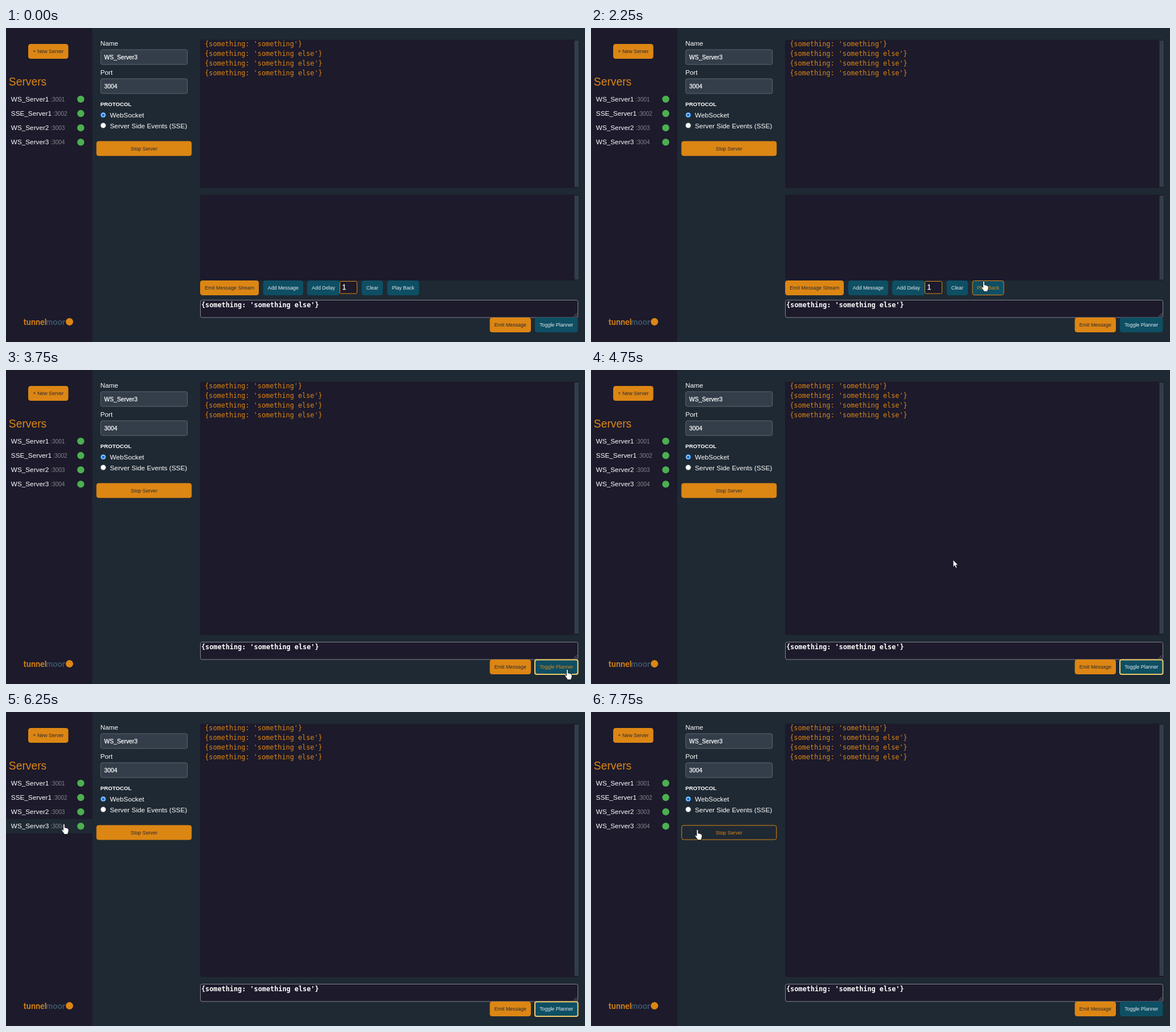
An HTML page for the animation above (8000 ms loop, 1017 by 551 pixels).

```html
<!DOCTYPE html>
<html lang="en">
<head>
<meta charset="utf-8">
<title>Server panel</title>
<style>
html, body { margin: 0; width: 100%; height: 100%; overflow: hidden; background: #1f2933; }
svg { display: block; width: 1017px; height: 551px; font-family: "Liberation Sans", Arial, sans-serif; }
text { white-space: pre; }
.mono { font-family: "DejaVu Sans Mono", monospace; font-size: 11.83px; }
.btn { font-size: 8.87px; text-anchor: middle; }
</style>
</head>
<body>
<svg id="stage" viewBox="0 0 1017 551"></svg>
<script>
const ORANGE = '#dc8614', TEAL = '#0e4f64', DARK = '#1c1a2b', BG = '#1f2933', SLATE = '#333e4a';
const stage = document.getElementById('stage');

function add(tag, attrs, content = '') {
  const el = document.createElementNS('http://www.w3.org/2000/svg', tag);
  set(el, attrs);
  el.textContent = content;
  stage.append(el);
  return el;
}
function set(el, attrs) {
  for (const k in attrs) el.setAttribute(k, attrs[k]);
}
const box = (x, y, width, height, fill, more) => add('rect', { x, y, width, height, fill, ...more });
const text = (x, y, size, fill, str, more) => add('text', { x, y, 'font-size': size, fill, ...more }, str);
const inside = (p, x, y, w, h) => p && p[0] >= x && p[0] < x + w && p[1] >= y && p[1] < y + h;

// Sidebar
box(0, 0, 151.5, 551, DARK);
text(4.8, 100.5, 19.3, ORANGE, 'Servers');
const rows = ['WS_Server1', 'SSE_Server1', 'WS_Server2', 'WS_Server3'].map((name, i) => {
  const y = 112.3 + i * 25.15;
  const el = box(0, y, 151.5, 25.15, DARK);
  text(8.8, y + 16.5, 11.75, '#fff', name);
  text(i === 1 ? 82.5 : 78.3, y + 16.5, 10, '#85858d', ':' + (3001 + i));
  add('circle', { cx: 131.3, cy: y + 12.6, r: 6.2, fill: '#4caf50' });
  return { el, y };
});
const brand = { 'font-family': 'Lato, sans-serif', 'font-weight': 700 };
text(30.5, 521, 14.3, ORANGE, 'tunnel', brand);
text(104, 521, 14.3, '#3f566b', 'moor', { ...brand, 'text-anchor': 'end' });
add('circle', { cx: 111.5, cy: 515.5, r: 6.5, fill: ORANGE });

// Server form
text(165.7, 31, 11.75, '#fff', 'Name');
text(165.7, 81.6, 11.75, '#fff', 'Port');
[[38, 'WS_Server3'], [89, '3004']].forEach(([y, value]) => {
  box(166.4, y, 152.2, 26, SLATE, { rx: 3, stroke: '#5c6670' });
  text(172.6, y + 16.6, 10.3, '#fff', value, { stroke: '#fff', 'stroke-width': .25 });
});
text(165.7, 136.6, 9.7, '#fff', 'PROTOCOL', { 'font-weight': 700 });
[[152.7, 'WebSocket'], [171, 'Server Side Events (SSE)']].forEach(([cy, label], i) => {
  add('circle', { cx: 170.8, cy, r: i ? 4.6 : 4.2, fill: '#fff', stroke: i ? '#777' : '#1275d8', 'stroke-width': i ? .7 : 1.2 });
  if (!i) add('circle', { cx: 170.8, cy, r: 2.7, fill: '#1275d8' });
  text(182.5, cy + 4.7, 11.8, '#fff', label);
});

// Message log and planner
const log = box(341, 20.5, 666, 260, DARK, { rx: 3 });
const logBar = box(998.5, 22, 7.5, 257, SLATE);
const lines = ["{something: 'something'}", ...Array(3).fill("{something: 'something else'}")];
lines.forEach((line, i) => text(349.2, 32.3 + i * 17, 11.83, ORANGE, line, { class: 'mono' }));
const planner = [
  box(341, 292.5, 666, 150.5, DARK, { rx: 3 }),
  box(998.5, 294, 7.5, 147.5, SLATE),
  box(586.5, 444.5, 30, 21.5, DARK, { rx: 2, stroke: ORANGE }),
  text(590.5, 459.3, 12.5, '#fff', '1', { stroke: '#fff', 'stroke-width': .3 })
];
box(341.5, 477.5, 663, 30.5, DARK, { rx: 3, stroke: '#85858c' });
text(343, 489.8, 11.83, '#fff', lines[1], { class: 'mono', 'font-weight': 700 });
add('path', { d: 'M997 506.5l6-6M1000.5 506.5l2.5-2.5', stroke: '#999', 'stroke-width': .8 });

const buttons = [
  ['+ New Server', 39, 28, 70.5],
  ['Stop Server', 158.7, 198.5, 167.5],
  ['Emit Message Stream', 341, 443, 103, 1],
  ['Add Message', 451.7, 443, 70.3, 1],
  ['Add Delay', 529, 443, 57, 1],
  ['Clear', 624.7, 443, 37.3, 1],
  ['Play Back', 669.5, 443, 56, 1],
  ['Emit Message', 849.7, 508, 72.3],
  ['Toggle Planner', 929, 508, 75.5]
].map(([label, x, y, w, planned]) => {
  const teal = /^(Add|Clear|Play|Toggle)/.test(label);
  const el = box(x + .5, y + .5, w - 1, 25, '', { rx: 3.5 });
  const tag = text(x + w / 2, y + 16, 8.87, '', label, { class: 'btn' });
  return { el, tag, x, y, w, planned, teal };
});
const ring = box(929, 508.5, 75.5, 25.5, 'none', { rx: 3, stroke: '#f0cc6a', 'stroke-width': 2 });

// Pointers, drawn with the hot spot at 0,0
const outline = { stroke: '#111', 'stroke-width': .9, 'stroke-linejoin': 'round' };
const pointers = {
  arrow: add('path', { d: 'M0 0V12.6L2.9 10L4.8 14.6L7 13.6L5.1 9.2H8.8Z', fill: '#fff', ...outline }),
  hand: add('path', {
    d: 'M-1.6 .8Q-1.6-.6-.2-.6T1.2.8V6Q3.2 5.2 3.8 6.6Q5.4 6 6 7.4Q8 7 8 9V12Q8 14 6.8 15.3V17.6H-.4V15.8Q-2.6 13.6-4.2 10.6Q-4.6 8.8-3 8.8L-1.6 10.4Z',
    fill: '#fff', ...outline
  }),
  beam: add('path', { d: 'M-2.5-7.5H2.5M0-7.5V7.5M-2.5 7.5H2.5', fill: 'none', stroke: '#fff' })
};

// Pointer place by time in ms; each holds until the next
const path = [
  [500, 504, 524], [750, 522, 497], [1000, 549, 455], [1250, 562, 450], [1500, 603, 455],
  [1750, 642, 450], [2000, 678, 447], [2250, 690, 445], [2500, 752, 466], [2750, 855, 500],
  [3000, 924, 517], [3250, 975, 524], [3500, 986, 526],
  [4250, 930, 480], [4500, 790, 410], [4750, 636, 333], [5000, 480, 258], [5250, 352, 194],
  [5500, 225, 160], [5750, 114, 173], [6000, 106, 194], [6250, 102, 197],
  [7500, 142, 202], [7750, 187, 207]
];

function draw(t) {
  const step = path.filter(p => p[0] <= t).pop();
  const pos = step && step.slice(1);
  const open = t < 3750;
  const show = (el, on) => set(el, { visibility: on ? 'visible' : 'hidden' });
  let hit = false;

  set(log, { height: open ? 260 : 444.5 });
  set(logBar, { height: open ? 257 : 441 });
  planner.forEach(el => show(el, open));
  show(ring, !open && t < 6750);

  for (const r of rows) {
    const over = inside(pos, 0, r.y, 151.5, 25.15);
    hit ||= over;
    set(r.el, { fill: over ? BG : DARK });
  }
  for (const b of buttons) {
    const on = open || !b.planned;
    const over = on && inside(pos, b.x, b.y, b.w, 26);
    hit ||= over;
    show(b.el, on);
    show(b.tag, on);
    const fill = b.teal ? TEAL : over ? BG : ORANGE;
    set(b.el, { fill, stroke: over ? ORANGE : fill });
    set(b.tag, { fill: over ? ORANGE : b.teal ? '#e4e8ea' : '#2b2a33' });
  }

  const typing = inside(pos, 341, 477, 664, 31) || open && inside(pos, 586, 444, 31, 22);
  const kind = hit ? 'hand' : typing ? 'beam' : 'arrow';
  for (const k in pointers) {
    show(pointers[k], pos && k === kind);
    if (pos) set(pointers[k], { transform: `translate(${pos})` });
  }
}

const start = performance.now();
function tick() {
  draw((performance.now() - start) % 8000);
  requestAnimationFrame(tick);
}
tick();
</script>
</body>
</html>
```
